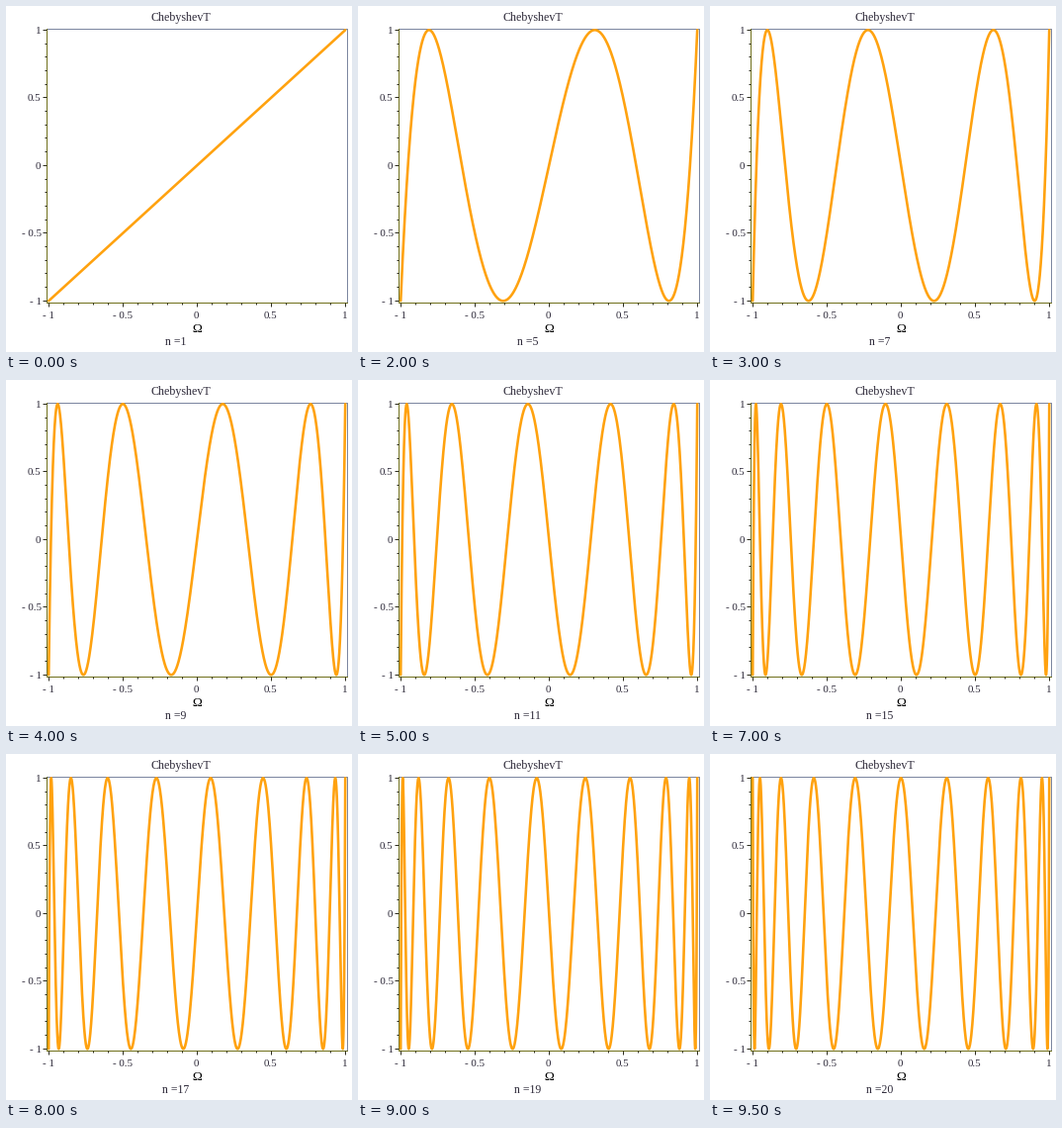
Animation of 350 by 350 pixels, one loop 10 s. Source, as a matplotlib script:

```python
import numpy as np
import matplotlib.pyplot as plt
from matplotlib.animation import FuncAnimation

SIZE, DPI = 350, 100
PX = 72 / DPI
LEFT, RIGHT, TOP, BOTTOM = 41, 345, 23, 300
INK, TICK, ORANGE = "#2c2838", "#2e2e20", "#ffa20f"
OLIVE, SLATE = "#70701c", "#7c86a0"

plt.rcParams["font.family"] = ["Liberation Serif", "DejaVu Serif"]
fig = plt.figure(figsize=(SIZE / DPI, SIZE / DPI), dpi=DPI, facecolor="white")
ax = fig.add_axes([0, 0, 1, 1])
ax.set(xlim=(0, SIZE), ylim=(SIZE, 0))
ax.axis("off")


def to_x(v):
    return 193.2 + 150 * v


def to_y(v):
    return 161.3 - 137 * v


def line(xs, ys, color, width=1, **style):
    return ax.plot(xs, ys, color=color, lw=width * PX, **style)[0]


def text(x, y, label, size, ha="center", color=INK):
    return ax.text(x, y, label, fontsize=size * PX, color=color, ha=ha,
                   va="baseline")


def number(v):
    return f"{v:g}".replace("-", "- ")


line([LEFT, RIGHT, RIGHT], [TOP, TOP, BOTTOM], SLATE)
line([LEFT, LEFT, RIGHT], [TOP, BOTTOM, BOTTOM], OLIVE)

for k in range(-10, 11):
    v = k / 10
    major = k % 5 == 0
    length = 4 if major else 2
    x, y = np.floor(to_x(v)), np.floor(to_y(v))
    line([x, x], [BOTTOM, BOTTOM + length], TICK, solid_capstyle="butt")
    line([LEFT - length, LEFT], [y, y], TICK, solid_capstyle="butt")
    if major:
        text(to_x(v) - 0.5, 316, number(v), 11)
        text(35.5, to_y(v) + 3.6, number(v), 11, ha="right")

text(176.5, 15, "ChebyshevT", 12)
text(193.2, 330, "\u03a9", 13.2, color="black")
order = text(171.3, 343, "", 11.8)

theta = np.linspace(np.pi, 0, 1200)
curve = line([], [], ORANGE, 2.6, solid_joinstyle="round",
             solid_capstyle="round", zorder=5)


def update(i):
    n = i + 1
    curve.set_data(to_x(np.cos(theta)), to_y(np.cos(n * theta)))
    order.set_text(f"n ={n}")
    return curve, order


anim = FuncAnimation(fig, update, frames=20, interval=500, repeat=True,
                     repeat_delay=0)
plt.show()
```
